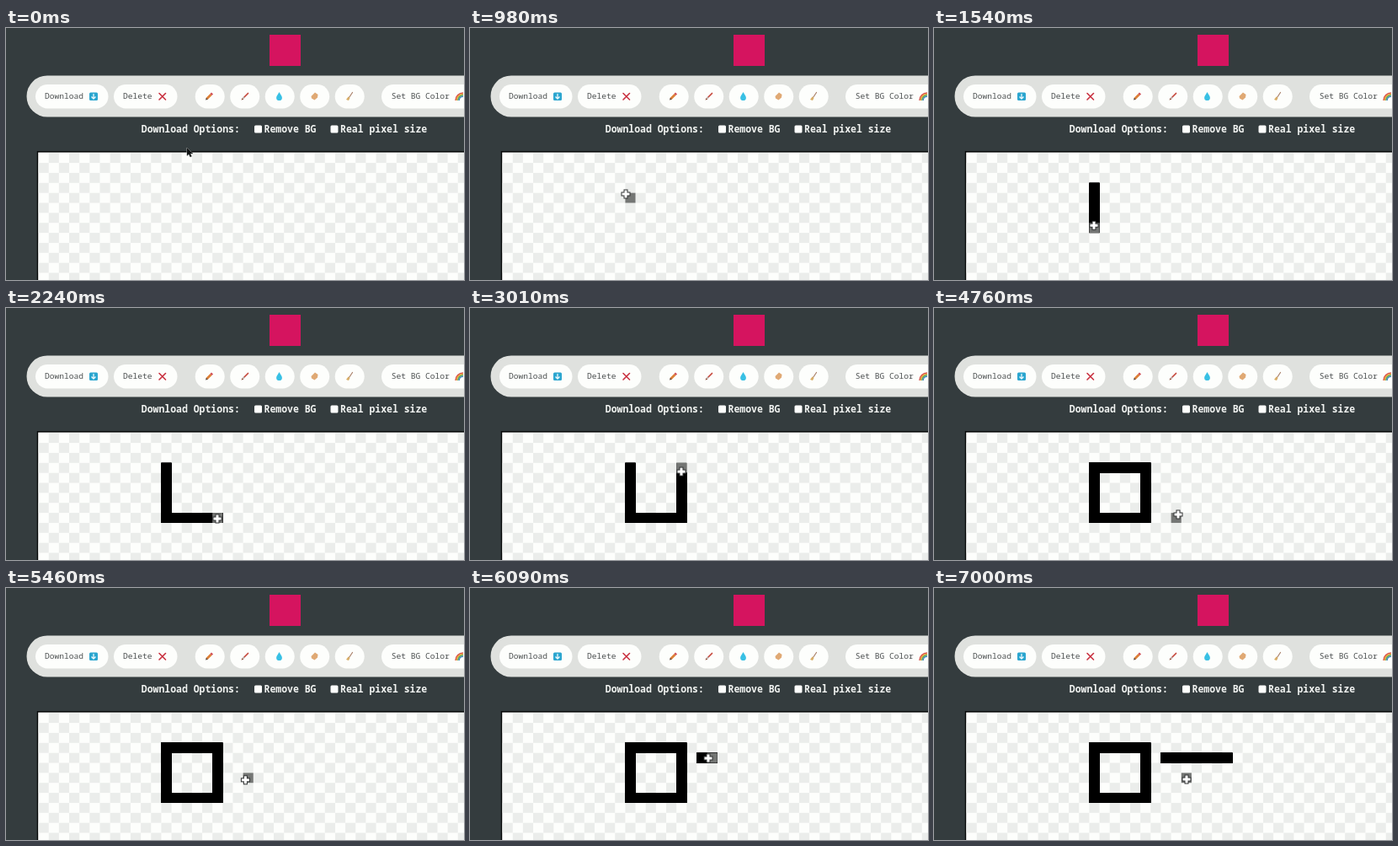
Recreate the animation shown at these times as an HTML page with a canvas. Size 544x299 px, loop 7.14 s.

```html
<!DOCTYPE html>
<html lang="en">
<head>
<meta charset="utf-8">
<title>Pixel editor</title>
<style>
html, body { margin: 0; width: 100%; height: 100%; overflow: hidden; background: #343c3e; }
svg, canvas { position: absolute; left: 0; top: 0; width: 544px; height: 299px; display: block; }
text { font-family: "Noto Sans Mono", "DejaVu Sans Mono", monospace; white-space: pre; }
.btn { font-size: 9.6px; fill: #4c5051; }
.opt { font-size: 11.47px; font-weight: 600; fill: #f0f2f0; }
.white { fill: #fdfefc; }
</style>
</head>
<body>
<svg viewBox="0 0 544 299">
  <rect x="313" y="8" width="37" height="37" fill="#d5145f"/>
  <rect x="24.500" y="56.500" width="600" height="49" rx="24.500" fill="#dfe1de"/>
  <g id="pills" class="white"></g>
  <g class="btn">
    <text x="46" y="84.300">Download</text>
    <text x="139" y="84.300">Delete</text>
    <text x="457.700" y="84.300">Set BG Color</text>
  </g>
  <!-- download, delete -->
  <rect x="99" y="76.500" width="10" height="9.500" rx="1.500" fill="#2ba6cf"/>
  <path d="M104 78v5.500M101.500 81.500l2.500 2.500 2.500-2.500" fill="none" stroke="#e8f7fc" stroke-width="1.300"/>
  <path d="M182 77.500l7.500 7.500M189.500 77.500l-7.500 7.500" stroke="#c9303f" stroke-width="1.600" stroke-linecap="round"/>
  <!-- pencil -->
  <path d="M238.500 84l5-5" stroke="#dd8038" stroke-width="2.800"/>
  <path d="M243.500 79l1.500-1.500" stroke="#cf4a52" stroke-width="2.800"/>
  <path d="M237 85.500l.8-2.800 2 2z" fill="#5a463a"/>
  <!-- brush -->
  <path d="M283 82l4.500-4.500" stroke="#c6483c" stroke-width="1.700" stroke-linecap="round"/>
  <path d="M281.500 83.500l1.500-1.500" stroke="#b9a8a4" stroke-width="2"/>
  <path d="M279.500 85.500l1-2.500 1.800 1.800z" fill="#8a4a35"/>
  <!-- drop -->
  <path d="M324.500 76c1.500 3 3.400 4.500 3.400 6.700a3.400 3.400 0 0 1-6.800 0c0-2.200 1.900-3.700 3.400-6.700z" fill="#38c0e4"/>
  <!-- sponge -->
  <path d="M362.500 81l4.500-4.500 3.500 2.500-.5 3.500-3.500 3-3.500-2z" fill="#e0a974"/>
  <!-- broom -->
  <path d="M411.500 76.500l-4 6" stroke="#a98068" stroke-width="1.200" stroke-linecap="round"/>
  <path d="M406.500 81.500l2 1.500-1.500 3-3-1z" fill="#d8ad66"/>
  <g id="rainbow" fill="none" stroke-width="1.500"></g>
  <g class="opt">
    <text x="160.800" y="124.300">Download Options:</text>
    <text x="306.500" y="124.300">Remove BG</text>
    <text x="397" y="124.300">Real pixel size</text>
  </g>
  <g id="boxes" class="white"></g>
</svg>
<canvas id="stage" width="544" height="299"></canvas>
<script>
function add(parent, tag, attrs) {
  const el = document.createElementNS('http://www.w3.org/2000/svg', tag);
  for (const k in attrs) el.setAttribute(k, attrs[k]);
  document.getElementById(parent).append(el);
}
const pill = (x, width) => add('pills', 'rect', { x, width, y: 67, height: 28.5, rx: 14.2 });
pill(35, 86.5);
pill(128, 75.5);
pill(446, 120);
for (let i = 0; i < 5; i++) pill(224.7 + i * 41.5, 35);
for (const x of [295, 385.5])
  add('boxes', 'rect', { x, y: 115.5, width: 9, height: 9, rx: 1.5 });
['#d9534a', '#eda23a', '#62ae57', '#4384c4'].forEach((stroke, i) => {
  const r = 9 - i * 1.4;
  add('rainbow', 'path', { stroke, d: `M${543 - r} 86a${r} ${r} 0 0 1 ${r} ${-r}` });
});

const LOOP = 7140, STEP = 140;
const GRID = { x: 38.6, y: 148.2, w: 12.15, h: 11.86 };
const ctx = document.getElementById('stage').getContext('2d');

// the picture advances every STEP, apart from a few longer holds
const holds = { 2240: 210, 3290: 210, 3640: 210, 3850: 210, 4760: 420, 5180: 280, 5740: 210, 6650: 210 };
function tickAt(t) {
  let tick = 0, next;
  while ((next = tick + (holds[tick] || STEP)) <= t) tick = next;
  return tick;
}

// pointer path: time, x, y
const path = [
  [0, 215, 142], [980, 185, 197], [1120, 190, 190], [1680, 190, 249],
  [2240, 251, 250], [3080, 251, 189], [3850, 196, 189], [4060, 190, 189],
  [4760, 290, 245], [5180, 290, 245], [5880, 276, 202], [6090, 283, 202],
  [6650, 349, 202], [7000, 300, 227]
];
const strokes = [[1120, 4060], [5880, 6650]];

function pointer(t) {
  const i = path.findIndex(p => p[0] > t);
  if (i < 0) return path[path.length - 1].slice(1);
  const [t0, x0, y0] = path[i - 1], [t1, x1, y1] = path[i];
  const k = (t - t0) / (t1 - t0);
  return [x0 + (x1 - x0) * k, y0 + (y1 - y0) * k];
}

const cellAt = ([x, y]) =>
  [Math.floor((x + 1 - GRID.x) / GRID.w), Math.floor((y + 1 - GRID.y) / GRID.h)];

function fillCell([c, r], color) {
  ctx.fillStyle = color;
  ctx.fillRect(GRID.x + c * GRID.w, GRID.y + r * GRID.h, GRID.w, GRID.h);
}

function drawBoard() {
  ctx.clearRect(0, 0, 544, 299);
  ctx.fillStyle = '#080a0a';
  ctx.fillRect(36.8, 146, 508, 153);
  ctx.fillStyle = '#fdfefc';
  ctx.fillRect(38.2, 147.6, 506, 152);
  for (let r = 0; r < 13; r++)
    for (let c = 1 - r % 2; c < 42; c += 2) fillCell([c, r], '#ebedeb');
}

// paint whole runs of cells so that neighbours join without seams
function drawStroke(from, to) {
  let a = cellAt(pointer(from));
  for (let s = from; s <= to; s += 10) {
    const b = cellAt(pointer(s));
    const c = Math.min(a[0], b[0]), r = Math.min(a[1], b[1]);
    ctx.fillStyle = '#000';
    ctx.fillRect(GRID.x + c * GRID.w, GRID.y + r * GRID.h,
      (Math.abs(a[0] - b[0]) + 1) * GRID.w, (Math.abs(a[1] - b[1]) + 1) * GRID.h);
    a = b;
  }
}

function drawArrow(x, y) {
  ctx.save();
  ctx.translate(x, y);
  ctx.beginPath();
  for (const p of [[0, 0], [0, 9.5], [2.2, 7.6], [3.8, 11], [5.4, 10.3], [3.9, 7], [7, 7]])
    ctx.lineTo(...p);
  ctx.closePath();
  ctx.strokeStyle = '#a4a8a7';
  ctx.stroke();
  ctx.fillStyle = '#101313';
  ctx.fill();
  ctx.restore();
}

function drawPlus(x, y) {
  [['#303333', 1], ['#fff', 0]].forEach(([color, edge]) => {
    const long = 4.5 + edge, thin = 1.5 + edge;
    ctx.fillStyle = color;
    ctx.fillRect(x - long, y - thin, long * 2, thin * 2);
    ctx.fillRect(x - thin, y - long, thin * 2, long * 2);
  });
}

function draw(t) {
  const pos = pointer(t);
  drawBoard();
  for (const [from, to] of strokes) drawStroke(from, Math.min(t, to));
  if (pos[1] < GRID.y) return drawArrow(...pos);
  fillCell(cellAt(pos), '#747674');
  drawPlus(...pos);
}

const start = performance.now();
let shown = -1;
function frame() {
  const tick = tickAt((performance.now() - start) % LOOP);
  if (tick !== shown) draw(shown = tick);
  requestAnimationFrame(frame);
}
frame();
</script>
</body>
</html>
```
